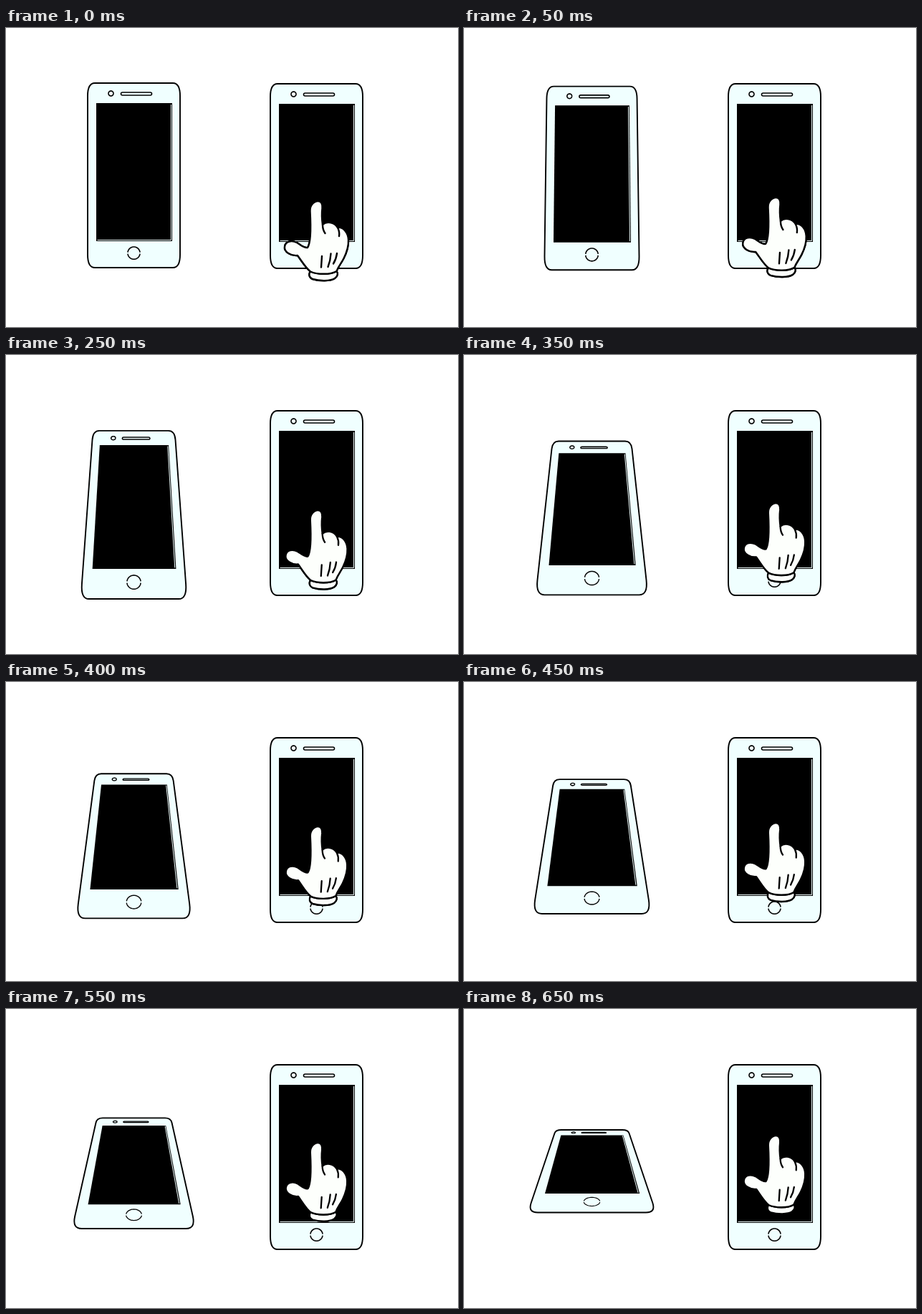
Animation of 631 by 418 pixels, one loop 700 ms. Source, as an HTML page with a canvas:

```html
<!DOCTYPE html>
<html lang="en">
<head>
<meta charset="utf-8">
<title>Tilting phone</title>
<style>
html, body { margin: 0; width: 100%; height: 100%; overflow: hidden; background: #fff; }
canvas { display: block; width: 631px; height: 418px; }
</style>
</head>
<body>
<canvas id="stage" width="631" height="418"></canvas>
<script>
const ctx = document.getElementById('stage').getContext('2d');
const STEP = 50, STEPS = 14, DEPTH = 420;
const SHELL = '#f0ffff', GLOVE = '#fdfffc';

const palm = new Path2D(`M-8.5 14C-9 6 -3 0 2.5 0C7 0 9 4 8.5 10C7.5 18 8 26 9 33
  C14 28 25 29 30 37C38 36 44.5 44 45 54C45.5 64 42 73 38.5 80C35 87 31 91 28.5 98
  C20 103 2 103 -8 98.5C-15 93 -20 84 -26 76C-35 77 -45 71 -44 64
  C-43 55 -33 55 -27 58C-22 61 -17 66 -12 65C-7 58 -7.5 32 -8.5 14Z`);
const cuff = new Path2D('M-8 98C-11 103 -9.5 107 -5 109C5 112 20 112 26 108C30 105 31 101 28.5 98Z');
const creases = new Path2D(`M9 33Q9 40 12.5 45M30 37Q33 43 32 49
  M8 77L7 92.5M20.5 73.5Q20 83 16.5 92M29 73Q28 81 24 87.5`);

// Projects a point of the phone face, tilted back by angle a.
function projector(cx, cy, a) {
  const sin = Math.sin(a), cos = Math.cos(a);
  const squash = 1 - 0.026 * sin;
  return (x, y) => {
    const k = DEPTH / (DEPTH - y * sin);
    return [cx + x * k, cy + 5.2 * sin + y * cos * k * squash];
  };
}

function roundBox(p, x0, y0, x1, y1, rx, ry) {
  const curve = (ax, ay, bx, by) => ctx.quadraticCurveTo(...p(ax, ay), ...p(bx, by));
  ctx.beginPath();
  ctx.moveTo(...p(x0 + rx, y0));
  ctx.lineTo(...p(x1 - rx, y0));
  curve(x1, y0, x1, y0 + ry);
  ctx.lineTo(...p(x1, y1 - ry));
  curve(x1, y1, x1 - rx, y1);
  ctx.lineTo(...p(x0 + rx, y1));
  curve(x0, y1, x0, y1 - ry);
  ctx.lineTo(...p(x0, y0 + ry));
  curve(x0, y0, x0 + rx, y0);
  ctx.closePath();
}

function arc(p, x, y, r, from, to) {
  ctx.beginPath();
  for (let i = 0; i <= 24; i++) {
    const a = from + (to - from) * i / 24;
    ctx.lineTo(...p(x + r * Math.cos(a), y + r * Math.sin(a)));
  }
  ctx.stroke();
}

function line(p, x0, y0, x1, y1) {
  ctx.beginPath();
  ctx.moveTo(...p(x0, y0));
  ctx.lineTo(...p(x1, y1));
  ctx.stroke();
}

function phone(cx, cy, a) {
  const p = projector(cx, cy, a);
  ctx.strokeStyle = '#000';
  ctx.fillStyle = SHELL;
  ctx.lineWidth = 1.9;
  roundBox(p, -64.5, -129, 64.5, 129, 10, 18);
  ctx.fill();
  ctx.stroke();

  ctx.lineWidth = 0.8 + 0.8 * Math.cos(a);
  roundBox(p, -18, -116, 25, -112, 2, 2);
  ctx.stroke();
  arc(p, -32, -114.5, 3.5, 0, 2 * Math.PI);
  arc(p, 0, 108.6, 8.6, 0.12, Math.PI - 0.12);
  arc(p, 0, 108.6, 8.6, Math.PI + 0.12, 2 * Math.PI - 0.12);

  ctx.fillStyle = '#000';
  roundBox(p, -52.5, -101, 53.5, 92, 0, 0);
  ctx.fill();
  ctx.strokeStyle = SHELL;
  ctx.lineWidth = 1;
  line(p, 52, -99, 52, 90.5);
  if (a === 0) line(p, -51, 90.5, 52, 90.5);
}

function hand(n) {
  ctx.save();
  ctx.translate(433, 242 - 5 * n);
  ctx.scale(1 - 0.04 * Math.min(1, n / 6), 1 - 0.0012 * n);
  ctx.lineJoin = ctx.lineCap = 'round';
  ctx.strokeStyle = '#000';
  ctx.fillStyle = GLOVE;
  ctx.lineWidth = 2.6;
  for (const part of [cuff, palm]) {
    ctx.stroke(part);
    ctx.fill(part);
    ctx.lineWidth = 2.4;
    ctx.stroke(part);
  }
  ctx.stroke(creases);
  ctx.restore();
}

function draw() {
  const n = Math.floor(performance.now() / STEP) % STEPS;
  ctx.fillStyle = '#fff';
  ctx.fillRect(0, 0, 631, 418);
  phone(178.5, 206, n * 5 * Math.PI / 180);
  phone(433.5, 207, 0);
  hand(n);
  requestAnimationFrame(draw);
}
draw();
</script>
</body>
</html>
```
